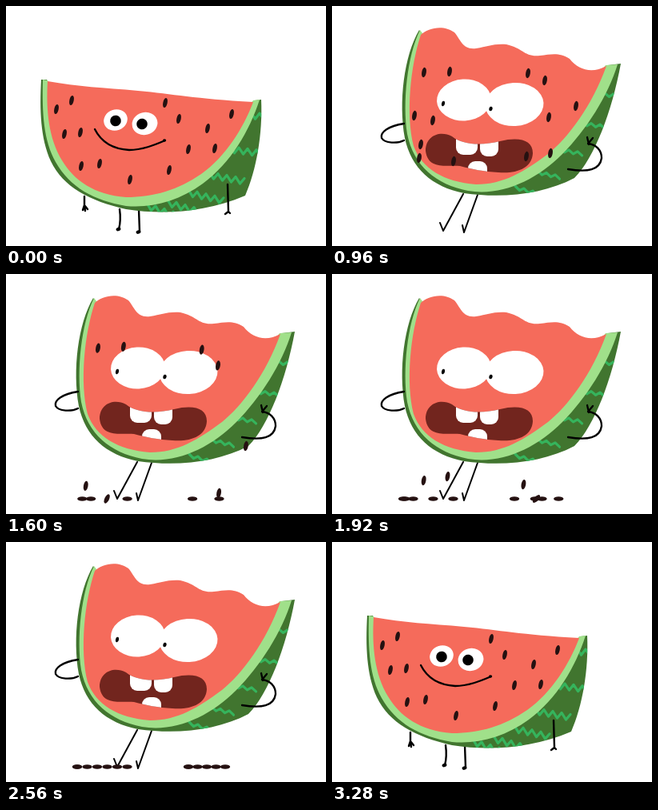
These frames come from a looping animation (400 px wide and 300 px high, 3.36 s). An HTML page with a canvas:

```html
<!DOCTYPE html>
<html lang="en">
<head>
<meta charset="utf-8">
<title>Watermelon</title>
<style>
  html, body { margin: 0; width: 100%; height: 100%; overflow: hidden; background: #fff; }
  canvas { display: block; width: 400px; height: 300px; }
</style>
</head>
<body>
<canvas id="stage"></canvas>
<script>
const LOOP = 3360, STEP = 80, GROUND = 281, GRAVITY = 0.001;
const BITE = 960, SQUASH = 3040, RECOVER = 3120;
const RED = '#f56b5b', LIGHT = '#a0e08a', DARK = '#41752f', ZIG = '#35b45c';
const SEED = '#251111', INK = '#000', MOUTH = '#72251e';

const canvas = document.getElementById('stage');
const ratio = window.devicePixelRatio || 1;
canvas.width = 400 * ratio;
canvas.height = 300 * ratio;
const ctx = canvas.getContext('2d');

const clamp = v => Math.max(0, Math.min(1, v));
const mix = (a, b, k) => a + (b - a) * k;
const ease = k => k * k * (3 - 2 * k);

const calm = {
  rind: new Path2D('M44 92C42 130 43 165 56 194C71 226 105 244 150 254C195 261 247 259 299 237C313 205 321 160 319 117L311 118L290 140L60 110L51 92Z'),
  pith: new Path2D('M46 92C45 135 47 168 62 195C80 227 110 243 150 250C182 253 216 244 246 222C281 196 304 157 317 117L309 118L290 140L60 110L52 93Z'),
  flesh: new Path2D('M52 94C90 101 122 102 165 106C210 110 235 116 309 120C297 152 275 188 244 210C215 230 185 239 150 239C110 236 85 218 70 193C53 165 50 130 52 94Z'),
  limbs: new Path2D('M98 238L98 249L96 255M98 249L99 256M98 249L102 254M142 254Q144 268 141 279M166 254L167 282'),
  hand: new Path2D('M277 223L278 257L274 260M278 257L280 259'),
  smile: new Path2D('M111 154C120 172 137 179 154 180C170 180 185 174 199 168')
};

const shocked = {
  rind: new Path2D('M109 30C90 62 83 120 91 165C99 203 125 226 165 234C215 241 265 235 303 215C328 190 350 132 361 72L345 74L280 170L112 34Z'),
  pith: new Path2D('M110 30C94 62 88 120 94 160C102 200 130 223 170 231C212 238 255 218 288 185C318 155 345 112 357 73L342 74L270 160L113 34Z'),
  flesh: new Path2D('M111 36C120 27 140 23 153 33C161 42 163 55 180 53C195 51 200 47 218 48C240 53 240 64 260 62C275 60 285 58 297 66C308 80 325 85 343 75C325 125 295 165 270 185C240 207 215 223 180 223C140 220 112 203 102 175C92 135 98 75 111 36Z'),
  arms: new Path2D('M90 147C70 150 60 158 62 165C66 172 82 172 90 168M295 204C320 208 335 205 337 190C337 180 330 173 320 172M321 173L319 164M321 171L326 165'),
  legs: new Path2D('M164 235L139 281L135 271M182 236L165 283L163 274'),
  mouth: new Path2D('M117 181C117 162 135 155 150 163C165 175 190 174 210 169C235 163 251 168 251 184C250 203 230 210 208 208C190 207 175 204 160 200C145 198 120 206 117 181Z')
};

// A short straight run of evenly spaced seeds
const row = (x, y, dx, dy, n = 2) =>
  Array.from({ length: n }, (_, i) => ({ x: x + dx * i, y: y + dy * i }));

const calmSeeds = [
  row(63, 129, 19, -11), row(73, 160, 20, -2), row(94, 200, 23, -3),
  row(199, 121, 17, 20), row(252, 153, -24, 26, 3), row(282, 135, -21, 43),
  row(155, 217, 0, 0, 1)
].flat();

// Lower seeds let go first; each side settles into a neat line on the ground
function loosen(rows, first, gap) {
  const seeds = rows.flat().sort((a, b) => a.x - b.x);
  const slots = seeds.length - 1;
  return seeds.map((s, i) => ({
    ...s,
    rest: first + gap * Math.floor(i * slots / seeds.length),
    start: 1900 - 4.8 * s.y,
    tilt: 10
  }));
}

const looseSeeds = [
  ...loosen([row(115, 83, 32, -1), row(103, 137, 23, 6), row(111, 173, -2, 17), row(152, 194, 0, 0, 1)], 89, 12.5),
  ...loosen([row(245, 84, 21, 9), row(305, 125, -34, 14), row(273, 184, -30, 4)], 228, 11.5)
];

function fill(path, color) {
  ctx.fillStyle = color;
  ctx.fill(path);
}

function line(path, width, color = INK) {
  ctx.strokeStyle = color;
  ctx.lineWidth = width;
  ctx.stroke(path);
}

function oval(x, y, rx, ry, deg, color) {
  ctx.fillStyle = color;
  ctx.beginPath();
  ctx.ellipse(x, y, rx, ry, deg * Math.PI / 180, 0, Math.PI * 2);
  ctx.fill();
}

// Zigzags that start along the curve of the rind and tip over towards the bottom
function stripes({ count, x, y, dx, drop, bend, length, amp }) {
  for (let i = 0; i < count; i++) {
    const path = new Path2D();
    const left = x - dx * i;
    const top = y + drop * (1 - (1 - i / (count - 1)) ** bend);
    for (let s = 0; s <= length; s += 5.5) {
      const side = Math.round(s / 5.5) % 2 ? amp : -amp;
      path.lineTo(left + s, top + s * (0.08 + 0.05 * i) + side);
    }
    line(path, 3.2, ZIG);
  }
}

function slice(body, pattern) {
  fill(body.rind, DARK);
  ctx.save();
  ctx.clip(body.rind);
  stripes(pattern);
  ctx.restore();
  fill(body.pith, LIGHT);
  fill(body.flesh, RED);
}

function tooth(x, y, w, h) {
  ctx.beginPath();
  ctx.roundRect(x, y, w, h, 9);
  ctx.fill();
}

function drawCalm(t) {
  line(calm.limbs, 2.4);
  slice(calm, { count: 6, x: 306, y: 137, dx: 26, drop: 113, bend: 2.1, length: 45, amp: 3.8 });
  line(calm.hand, 2.4);
  oval(140.5, 279, 3, 2.2, -20, INK);
  oval(165.5, 282.5, 3, 2.2, -20, INK);
  calmSeeds.forEach(s => oval(s.x, s.y, 2.7, 6.2, 12, SEED));

  const look = ease(clamp((t - 400) / 200));
  oval(137, 142.5, 15, 13, -20, '#fff');
  oval(173.5, 147, 16, 14, -15, '#fff');
  oval(mix(137, 127, look), 143.5, mix(6.8, 4.6, look), mix(6.8, 8.6, look), 12, INK);
  oval(mix(170, 162.5, look), 147.5, mix(6.8, 4.8, look), mix(6.8, 9, look), 10, INK);
  line(calm.smile, 2.3);
  oval(198, 168, 2, 1.8, 0, INK);
}

function drawShocked() {
  line(shocked.legs, 2);
  slice(shocked, { count: 5, x: 341, y: 111, dx: 28, drop: 116, bend: 1.3, length: 28, amp: 2 });
  line(shocked.arms, 2.3);
  oval(165, 117.5, 34, 26, -3, '#fff');
  oval(228, 123, 36.5, 27, -3, '#fff');
  oval(139, 122, 2, 3.3, 10, INK);
  oval(198.5, 128.5, 2.1, 2.8, 10, INK);
  fill(shocked.mouth, MOUTH);
  ctx.save();
  ctx.clip(shocked.mouth);
  ctx.fillStyle = '#fff';
  tooth(155, 155, 27, 31);
  tooth(185, 155, 23, 33);
  tooth(170, 194, 24, 30);
  ctx.restore();
}

function drawLoose(t) {
  for (const s of looseSeeds) {
    const fall = Math.max(0, t - s.start);
    const y = Math.min(GROUND, s.y + GRAVITY * fall * fall);
    const landed = s.start + Math.sqrt((GROUND - s.y) / GRAVITY);
    const x = mix(s.x, s.rest, clamp(fall / 740) ** 2);
    oval(x, y, 2.8, 6.2, mix(s.tilt, 90, clamp((t - landed) / STEP)), SEED);
  }
}

function draw(t) {
  ctx.setTransform(ratio, 0, 0, ratio, 0, 0);
  ctx.fillStyle = '#fff';
  ctx.fillRect(0, 0, 400, 300);
  ctx.lineCap = ctx.lineJoin = 'round';

  const wobble = Math.floor(t / STEP / 2) % 2;
  const bitten = t >= BITE && t < RECOVER;
  ctx.save();
  if (bitten) {
    if (t >= SQUASH) ctx.transform(1.116, 0, 0, 0.92, -38, 23);
    else ctx.translate(wobble * 1.2, 0);
    drawShocked();
  } else {
    ctx.translate(wobble * 0.4, wobble * 0.3);
    drawCalm(t < RECOVER ? t : 0);
  }
  ctx.restore();
  if (bitten) drawLoose(t);
}

function tick() {
  const t = performance.now() % LOOP;
  draw(Math.floor(t / STEP) * STEP);
  requestAnimationFrame(tick);
}
tick();
</script>
</body>
</html>
```
